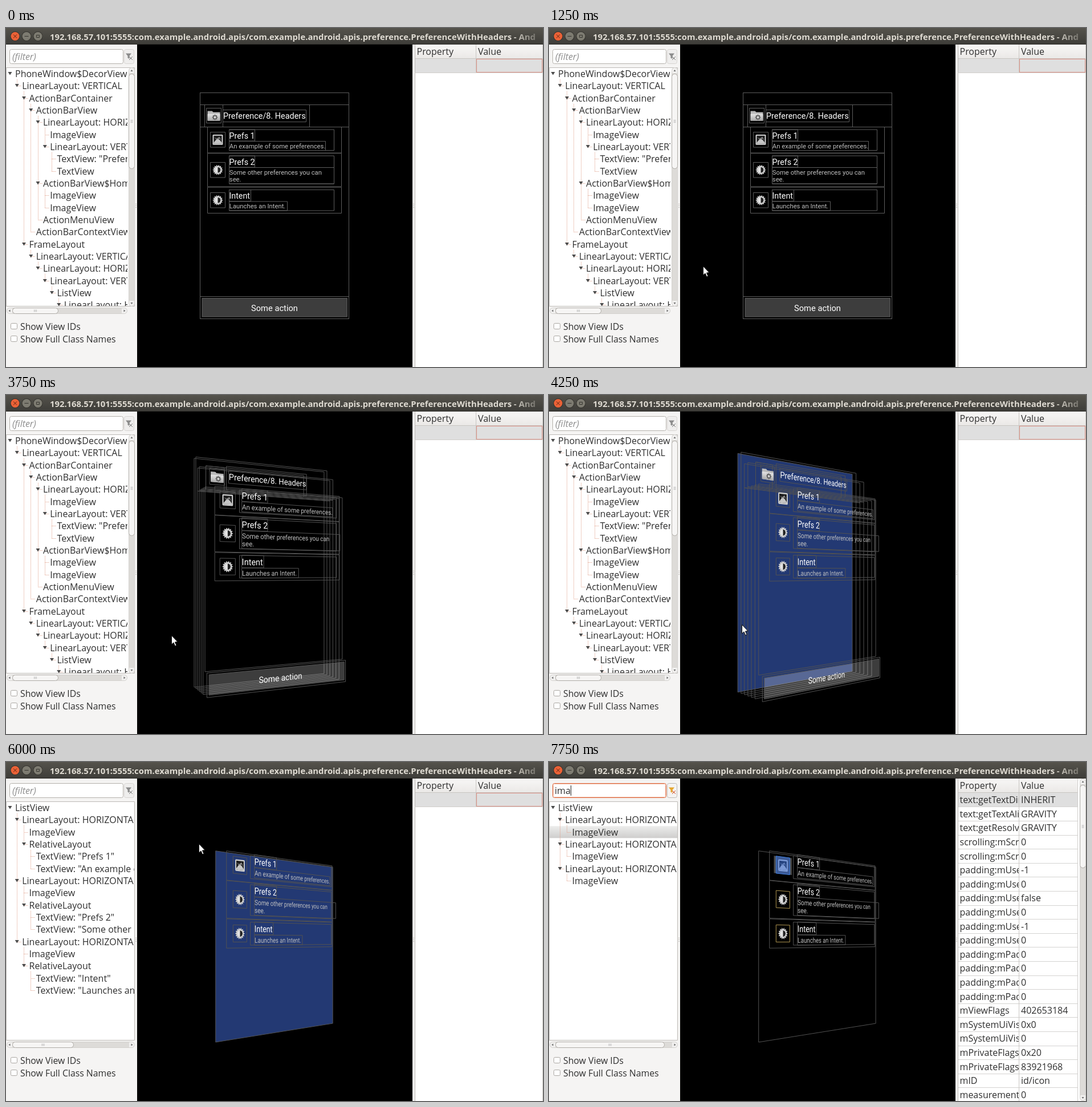
An HTML page with a canvas that plays this animation: 942 by 594 pixels, repeating every 8 s.

```html
<!DOCTYPE html>
<html lang="en">
<head>
<meta charset="utf-8">
<title>View hierarchy</title>
<style>
html, body { margin: 0; width: 100%; height: 100%; overflow: hidden; background: #000; }
canvas { display: block; }
</style>
</head>
<body>
<canvas id="stage" width="942" height="594"></canvas>
<script>
const ctx = document.getElementById('stage').getContext('2d');
const LOOP = 8000;
const UI = '"Open Sans", "Noto Sans", sans-serif';
const DROID = 'Roboto, "Noto Sans", sans-serif';
const INK = '#2f2f2f';

// ---------- timeline: each step changes part of the state ----------
const START = { tree: 'full', angle: 0, gap: 0, hover: '', cursor: null, beam: null,
  only: false, focus: false, query: '', picked: '' };
const STEPS = [
  [0, {}],
  [250, { cursor: [85, 489], hover: 'row0' }],
  [500, { cursor: [98, 464], hover: 'list' }],
  [750, { cursor: [180, 430], hover: 'pane' }],
  [1000, { cursor: [199, 402], hover: '' }],
  [1250, { cursor: [270, 417] }],
  [2500, { gap: 10.8 }],
  [3250, { cursor: [270.6, 417] }],
  [3500, { cursor: [281, 418], angle: 13 }],
  [3750, { cursor: [290, 421], angle: 25 }],
  [4000, { cursor: [302, 421], angle: 37.8 }],
  [4250, { cursor: [338, 402], angle: 39.2, hover: 'decor' }],
  [4500, { cursor: [368, 379], hover: 'list' }],
  [4750, { cursor: [373, 360] }],
  [5000, { cursor: [379, 342] }],
  [5250, { cursor: [377, 339] }],
  [5500, { only: true, tree: 'list' }],
  [6000, { cursor: [338, 143] }],
  [6250, { cursor: [319, 57] }],
  [6500, { cursor: null, beam: [157, 54], hover: '' }],
  [6750, { beam: [116.5, 56], focus: true }],
  [7500, { beam: null, query: 'i', picked: 'list' }],
  [7750, { query: 'ima', tree: 'images', picked: 'icon0' }]
];
const states = [];
STEPS.reduce((s, [, change]) => {
  const next = { ...s, ...change };
  states.push(next);
  return next;
}, START);

// ---------- view tree panel: leading digit is the level ----------
const H = 'LinearLayout: HORIZONTAL', V = 'LinearLayout: VERTICAL';
const row = (a, b) => `1${H}|2ImageView|2RelativeLayout|3TextView: "${a}"|3TextView: "${b}"`;
const parse = s => s.split('|').map(r => ({ level: +r[0], name: r.slice(1) }));
const TREES = {
  full: parse(`0PhoneWindow$DecorView|1${V}|2ActionBarContainer|3ActionBarView|4${H}|5ImageView|5${V}` +
    `|6TextView: "Preference/8. Headers"|6TextView|4ActionBarView$HomeView|5ImageView|5ImageView` +
    `|4ActionMenuView|3ActionBarContextView|2FrameLayout|3${V}|4${H}|5${V}|6ListView|7${H}|8ImageView`),
  list: parse(['0ListView', row('Prefs 1', 'An example of some preferences.'),
    row('Prefs 2', 'Some other preferences you can see.'), row('Intent', 'Launches an Intent.')].join('|')),
  images: parse('0ListView' + `|1${H}|2ImageView`.repeat(3))
};

const PROPS = ['text:getTextDirection()|INHERIT', 'text:getTextAlignment()|GRAVITY',
  'text:getResolvedTextAlignment()|GRAVITY', 'scrolling:mScrollX|0', 'scrolling:mScrollY|0',
  'padding:mUserPaddingBottom|-1', 'padding:mUserPaddingEnd|0', 'padding:mUserPaddingLeft|false',
  'padding:mUserPaddingRight|0', 'padding:mUserPaddingStart|-1', 'padding:mUserPaddingTop|0',
  'padding:mPaddingBottom|0', 'padding:mPaddingLeft|0', 'padding:mPaddingRight|0', 'padding:mPaddingTop|0',
  'mViewFlags|402653184', 'mSystemUiVisibility|0x0', 'mSystemUiVisibility|0', 'mPrivateFlags|0x20',
  'mPrivateFlags|83921968', 'mID|id/icon', 'measurement:mMinHeight|0'].map(s => s.split('|'));

// ---------- scene views, flat coordinates ----------
const views = [];
function view(depth, x1, y1, x2, y2, more) {
  views.push({ depth, x1, y1, x2, y2, ...more });
}
const L = 340.5, R = 601.5, B = 509.5;
view(0, L, 113.5, R, B, { id: 'decor' });
view(1, L, 113.5, R, B);
view(2, L, 134.5, R, 173.5);
view(3, L, 134.5, R, 173.5);
view(4, 348.5, 134.5, 532.5, 173.5);
view(4, 348.5, 134.5, 380.5, 173.5);
view(5, 351.5, 140.5, 377.5, 166.5, { icon: folder });
view(5, 380.5, 134.5, 532.5, 173.5);
view(6, 380.5, 143.5, 526.5, 164.5, { text: [['Preference/8. Headers', 381, 159, 14.4]] });
for (let d = 2; d < 6; d++) view(d, L, 173.5, R, B, { id: d == 5 ? 'pane' : '' });
view(6, L, 173.5, R, 470.5, { id: 'list', list: true });
view(7, L, 470.5, R, B);
view(7, 344, 473.5, 598.5, 506, { fill: 'rgba(255,255,255,.24)', text: [['Some action', 430, 495.5, 14.7]] });
[
  [173.5, 219, 182.5, 36.5, 'Prefs 1', 437, picture, 561, ['An example of some preferences.']],
  [219.5, 278, 235.5, 49, 'Prefs 2', 437, sun, 576, ['Some other preferences you can', 'see.']],
  [279, 324.5, 288.5, 36.5, 'Intent', 430, sun, 494, ['Launches an Intent.']]
].forEach(([top, bottom, iconY, height, title, titleEnd, icon, end, lines], i) => {
  const list = true, y = top + 4.5;
  view(7, 353.5, top, 588.5, bottom, { list, id: 'row' + i });
  view(8, 358.5, iconY, 384.5, iconY + 26.5, { list, icon, image: true, id: 'icon' + i });
  view(8, 391.5, y, 575.5, y + height, { list });
  view(9, 391.5, y, titleEnd - .5, y + 20, { list, text: [[title, 391.4, y + 15.8, 14.3]] });
  view(9, 391.5, y + 20.5, end - .5, y + height,
    { list, small: true, text: lines.map((s, k) => [s, 391.8, y + 32.8 + k * 12.4, 11.3]) });
});
views.sort((a, b) => a.depth - b.depth);

// ---------- drawing helpers ----------
function rect(x, y, w, h, fill, stroke, radius = 0) {
  ctx.beginPath();
  ctx.roundRect(x, y, w, h, radius);
  if (fill) { ctx.fillStyle = fill; ctx.fill(); }
  if (stroke) { ctx.strokeStyle = stroke; ctx.stroke(); }
}
function line(x1, y1, x2, y2, color) {
  ctx.strokeStyle = color;
  ctx.beginPath();
  ctx.moveTo(x1, y1);
  ctx.lineTo(x2, y2);
  ctx.stroke();
}
function poly(points, fill, stroke) {
  ctx.beginPath();
  points.forEach(([x, y]) => ctx.lineTo(x, y));
  ctx.closePath();
  if (fill) { ctx.fillStyle = fill; ctx.fill(); }
  if (stroke) { ctx.strokeStyle = stroke; ctx.stroke(); }
}
function disc(x, y, r, fill, from = 0, to = 7) {
  ctx.beginPath();
  ctx.arc(x, y, r, from, to);
  ctx.fillStyle = fill;
  ctx.fill();
}
function label(s, x, y, color = INK, font = '16px ') {
  ctx.font = font + UI;
  ctx.fillStyle = color;
  ctx.fillText(s, x, y);
}
function shade(x1, y1, x2, y2, ...colors) {
  const g = ctx.createLinearGradient(x1, y1, x2, y2);
  colors.forEach((c, i) => g.addColorStop(i / (colors.length - 1), c));
  return g;
}
function clipped(x, y, w, h, draw) {
  ctx.save();
  ctx.beginPath();
  ctx.rect(x, y, w, h);
  ctx.clip();
  draw();
  ctx.restore();
}
const burst = (n, inner, outer) => Array.from({ length: n * 2 }, (_, i) => {
  const r = i % 2 ? inner : outer, a = i * Math.PI / n;
  return [r * Math.cos(a), r * Math.sin(a)];
});

// ---------- icons, centred on 0,0 ----------
function folder() {
  poly([[-11, -8], [-3, -8], [-1, -6], [11, -6], [11, 9], [-11, 9]], '#b9b9b9');
  rect(-11, -3, 22, 12, shade(0, -3, 0, 9, '#e4e4e4', '#a9a9a9'), null, 1);
  ctx.translate(2, 3);
  poly(burst(8, 3.8, 5.2), '#666');
  disc(0, 0, 1.9, '#d8d8d8');
}
function picture() {
  rect(-9, -9, 18, 18, '#d2d2d2', null, 1.5);
  rect(-7, -7, 14, 14, '#1c1c1c');
  poly([[-7, 7], [-7, 5], [-3, 0], [0, -2], [4, 1], [7, 5], [7, 7]], '#c6c6c6');
  poly([[-6, -4], [-2, -2], [3, -5], [6, 1], [3, -2], [-2, 0]], '#8a8a8a');
}
function sun() {
  poly(burst(14, 6.8, 9.3), '#cdcdcd');
  disc(0, 0, 4.8, '#e4e4e4');
  disc(0, 0, 4.8, '#222', -Math.PI / 2, Math.PI / 2);
}

// ---------- 3D scene ----------
function drawScene(s) {
  rect(230, 29, 483, 565, '#000');
  const a = s.angle * Math.PI / 180, cos = Math.cos(a), sin = Math.sin(a), CX = 471.5, CY = 311.5;
  const project = (x, y, z) => {
    x -= CX;
    const k = 830 / (830 - z * cos + x * sin);
    return [CX + (x * cos + z * sin) * k, CY + (y - CY) * k];
  };
  const local = (x, y, z, draw) => {
    const p = project(x, y, z), u = project(x + 1, y, z), v = project(x, y + 1, z);
    ctx.save();
    ctx.transform(u[0] - p[0], u[1] - p[1], v[0] - p[0], v[1] - p[1], p[0], p[1]);
    draw();
    ctx.restore();
  };
  const write = ([str, x, y, size], z, color) => {
    ctx.font = size + 'px ' + DROID;
    ctx.fillStyle = color;
    if (!s.gap) return ctx.fillText(str, x, y);
    let from = x;
    [...str].forEach((ch, i) => {
      local(from, y, z, () => ctx.fillText(ch, 0, 0));
      from = x + ctx.measureText(str.slice(0, i + 1)).width;
    });
  };
  for (const v of views) {
    if (s.only && !v.list) continue;
    const z = (v.depth - 4.6) * s.gap;
    const quad = (m = 0) => [[v.x1 - m, v.y1], [v.x2 + m, v.y1], [v.x2 + m, v.y2], [v.x1 - m, v.y2]]
      .map(([x, y]) => project(x, y, z));
    const picked = v.id && v.id == s.picked;
    const match = s.query == 'i' || s.query == 'ima' && v.image;
    if (picked && v.image) poly(quad(4), '#4a4a4a');
    if (v.fill) poly(quad(), v.fill);
    if (v.icon) local((v.x1 + v.x2) / 2, (v.y1 + v.y2) / 2, z, v.icon);
    if (v.id && v.id == s.hover) poly(quad(), 'rgba(70,115,230,.5)');
    if (picked) poly(quad(), 'rgba(45,105,225,.5)');
    poly(quad(), null, picked ? '#3f7fe0' : match ? '#b09650' : s.gap ? '#525252' : '#5c5c5c');
    (v.text || []).forEach(t => write(t, z, v.small ? '#c0c0c0' : '#fff'));
  }
}

// ---------- window parts ----------
function drawTitle() {
  rect(0, 0, 942, 29, shade(0, 0, 0, 29, '#55534c', '#3d3c38'));
  line(0, 28.5, 942, 28.5, '#2f2e2a');
  disc(16, 14.5, 8.5, '#35342f');
  disc(16, 14.5, 7.5, '#ec6237');
  line(13, 11.5, 19, 17.5, '#5a2412');
  line(19, 11.5, 13, 17.5, '#5a2412');
  for (const x of [36, 56]) {
    disc(x, 14.5, 8.5, '#35342f');
    disc(x, 14.5, 7.5, '#7d7b71');
  }
  line(32.5, 14.5, 39.5, 14.5, '#35342f');
  rect(53.5, 12.5, 5, 4, null, '#35342f');
  clipped(70, 0, 864, 28, () => label(
    '192.168.57.101:5555:com.example.android.apis/com.example.android.apis.preference.PreferenceWithHeaders - And',
    77, 20.5, shade(885, 0, 935, 0, '#dfdbd2', '#6a6861'), 'bold 14.83px '));
}

function drawFilter(s) {
  rect(6.5, 37.5, 199, 25, '#fff', s.focus ? '#dd6b42' : '#b3b0aa', 3);
  if (s.focus) {
    rect(7.5, 38.5, 197, 23, null, '#f0b49c', 2);
    label(s.query, 10, 55.5);
    const x = Math.round(10 + ctx.measureText(s.query).width) + .5;
    line(x, 41, x, 59, '#222');
  } else label('(filter)', 11, 55.5, '#8e8e8e', 'italic 16px ');
  const on = s.query;
  rect(207.5, 37.5, 17, 25, on ? '#f4f3f2' : '#efeeed', on ? '#bcb9b4' : '#d6d4d1', 3);
  poly([[210, 44.5], [220, 44.5], [216.5, 49], [216.5, 54], [213.5, 52.5], [213.5, 49]],
    on ? '#e5a62c' : '#8b8b8b');
  line(216, 50, 222, 56, on ? '#d14a22' : '#777');
  line(222, 50, 216, 56, on ? '#d14a22' : '#777');
}

function arrow(x, y, dx, dy) {
  poly([[x + dx * 2, y + dy * 2], [x - dx - dy * 2, y - dy - dx * 2], [x - dx + dy * 2, y - dy + dx * 2]], '#6a6a6a');
}
function scrollbar(x, y, length, start, size, vertical) {
  const box = (p, n, inset, ...look) => vertical
    ? rect(x + inset, p, 11 - inset * 2, n, ...look) : rect(p, y + inset, n, 11 - inset * 2, ...look);
  const from = vertical ? y : x, mid = (vertical ? x : y) + 5.5;
  box(from + .5, length - 1, .5, '#f1f0ef', '#d3d1ce', 5);
  box(from + 10, length - 20, 1, '#dddbd8');
  box(start + .5, size, .5, '#f6f5f4', '#aeaba6', 5);
  for (const k of [-2, 0, 2]) {
    const p = start + size / 2 + k;
    vertical ? rect(mid - 2, p, 4, 1, '#bbb') : rect(p, mid - 2, 1, 4, '#bbb');
  }
  if (vertical) { arrow(mid, y + 6, 0, -1); arrow(mid, y + length - 6, 0, 1); }
  else { arrow(x + 5.5, mid, -1, 0); arrow(x + length - 5.5, mid, 1, 0); }
}

function drawTree(s) {
  const items = TREES[s.tree], full = s.tree == 'full', width = full ? 213 : 225;
  const yOf = i => 80 + i * 21.34, xOf = level => 7 + 12.25 * level;
  rect(0.5, 69.5, 225, 418, '#fff', '#bdbab6');
  clipped(1, 70, width - 1, 417, () => {
    const chosen = s.picked == 'list' ? 0 : s.picked ? 2 : -1;
    if (chosen >= 0) {
      const y = yOf(chosen);
      rect(0, y - 10.5, 226, 21, shade(0, y - 10, 0, y + 10, '#ececeb', '#cfcecd'));
    }
    // each branch line runs down the column of the items it leads to
    ctx.setLineDash([1, 1]);
    items.forEach(({ level }, i) => {
      if (!level) return;
      let p = i;
      while (items[p].level != level - 1) p--;
      const y = Math.round(yOf(i)) + .5, x = Math.floor(xOf(level)) + .5;
      line(x, Math.round(yOf(p)) + 10, x, y, '#e0a08a');
      line(x, y, x + 7, y, '#e0a08a');
    });
    ctx.setLineDash([]);
    items.forEach(({ level, name }, i) => {
      const y = Math.round(yOf(i)), x = xOf(level), next = items[i + 1];
      if (next && next.level > level) {
        poly([[x - 3.5, y - 3], [x + 3.5, y - 3], [x, y + 2.5]], '#4b4b4b');
      }
      label(name, x + 9, y + 5.8);
    });
  });
  if (full) scrollbar(215, 69, 419, 80, 166, true);
  const thumb = { full: 80, list: 107, images: 191 }[s.tree];
  scrollbar(1, 490, full ? 212 : 225, 11, thumb, false);
}

function drawOptions() {
  ['Show View IDs', 'Show Full Class Names'].forEach((name, i) => {
    rect(8.5, 517.5 + i * 22, 11, 10, '#fff', '#aaa7a2', 2);
    label(name, 25, 529 + i * 22, INK, '15.8px ');
  });
}

function drawProps(s) {
  const loaded = s.query, right = loaded ? 928 : 942;
  rect(717, 29, 225, 565, '#fff');
  rect(717, 29, right - 717, 25, shade(0, 29, 0, 54, '#f8f7f6', '#eae8e6'));
  line(717, 53.5, right, 53.5, '#c8c6c2');
  rect(717, 54, right - 717, 24.5, '#dfdfdf');
  line(717.5, 29, 717.5, 594, '#bdbab6');
  label('Property', 720.5, 47.3);
  label('Value', 828, 47.3);
  if (loaded) {
    PROPS.forEach(([name, value], i) => {
      const y = 66.3 + i * 24.6, edge = Math.round(y + 12) + .5;
      line(718, edge, right, edge, '#d4d3d1');
      clipped(718, y - 12, 106, 24, () => label(name, 720.5, y + 5.8));
      label(s.picked == 'list' && name == 'mID' ? 'id/list' : value, 828, y + 5.8);
    });
    line(right - .5, 29, right - .5, 594, '#d0cecb');
    scrollbar(931, 29, 565, 40, 145, true);
  } else line(717, 78.5, 942, 78.5, '#d0cecb');
  line(824.5, 29, 824.5, loaded ? 594 : 78, '#c8c6c2');
  if (!s.focus) {
    ctx.setLineDash([1, 1]);
    rect(825.5, 54.5, 115, 23, null, '#d8442f');
    ctx.setLineDash([]);
  }
  line(941.5, 29, 941.5, 594, '#c8c6c2');
}

function drawPointer(s) {
  ctx.save();
  if (s.cursor) {
    ctx.translate(...s.cursor);
    poly([[.5, .5], [.5, 16], [4, 12.8], [6.6, 18.8], [9, 17.8], [6.4, 12], [11, 11.6]], '#fff', '#111');
  }
  if (s.beam) {
    ctx.translate(...s.beam);
    for (const [color, w] of [['#fff', 4], ['#111', 1.8]]) {
      ctx.lineWidth = w;
      line(0, -7, 0, 7, color);
      line(-3.5, -7, 3.5, -7, color);
      line(-3.5, 7, 3.5, 7, color);
    }
  }
  ctx.restore();
}

function paint(s) {
  rect(0, 0, 942, 594, '#f5f4f3');
  drawTitle();
  drawFilter(s);
  drawTree(s);
  drawOptions();
  clipped(230, 29, 483, 565, () => drawScene(s));
  drawProps(s);
  for (const x of [227, 714]) for (const y of [308, 311, 314]) rect(x, y, 2, 1, '#bbb8b3');
  drawPointer(s);
}

const begin = performance.now();
let shown = -1;
function tick() {
  const t = (performance.now() - begin) % LOOP;
  const now = STEPS.filter(([at]) => at <= t).length - 1;
  if (now != shown) paint(states[shown = now]);
  requestAnimationFrame(tick);
}
tick();
</script>
</body>
</html>
```
